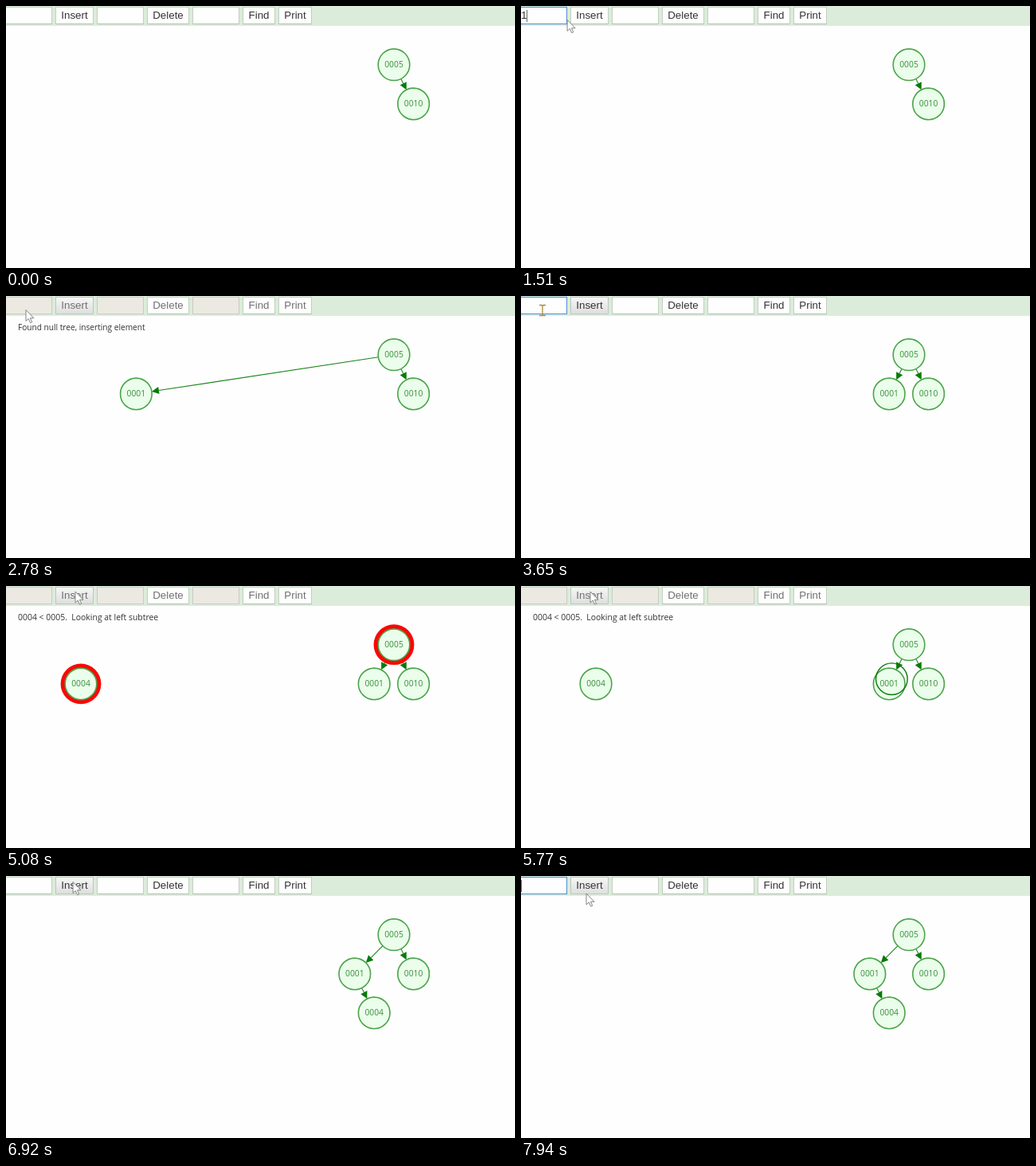
Recreate the animation shown at these times as an HTML page. Size 639x329 px, loop 7.99 s.

```html
<!DOCTYPE html>
<html lang="en">
<head>
<meta charset="utf-8">
<title>Binary search tree insertion</title>
<style>
  html, body { margin: 0; width: 100%; height: 100%; overflow: hidden; background: #fefefe; }
  #bar { position: absolute; left: 0; top: 0; width: 100%; height: 25px; background: #dcecda; }
  .ctl {
    position: absolute; top: 1px; height: 22px; box-sizing: border-box;
    border: 1px solid #c3cfc1; border-bottom-color: #b4beb2; background: #fefefe;
    font: 13.333px/20px Arial, "Liberation Sans", sans-serif; color: #333;
    text-align: center; white-space: pre;
  }
  .field { text-align: left; padding-left: 5px; }
  .off .ctl { color: #707070; }
  .off .field { background: #ece9e3; border-color: #c9cbc0; }
  .ctl.hot { background: linear-gradient(#f6f6f6, #dfdfdf); border-color: #bcc6c2; }
  .ctl.focus { border-color: #4a8fe0; }
  #caret { position: absolute; top: 5px; width: 1px; height: 15px; background: #666; }
  svg { position: absolute; left: 0; top: 0; }
  svg text { font-family: "Open Sans", "Noto Sans", sans-serif; }
</style>
</head>
<body>
<div id="bar"></div>
<svg id="stage" width="639" height="329" viewBox="0 0 639 329"></svg>
<script>
const LOOP = 7990, R = 19.8;
const bar = document.getElementById('bar');
const stage = document.getElementById('stage');

// Moments of the two insertions
const A = { make: 2005, compare: 2375, move: 2747, end: 3090, ready: 3160 };
const B = { make: 4711, compare: 5080, walk: 5449, compare2: 5818, move: 6187, end: 6530, ready: 6590 };

const ROOT = [487, 73.7], RIGHT = [511.6, 122.9], LEFT = [462.2, 122.9];
const LEFT_END = [437.8, 122.9], LEAF = [462.2, 171.9], SPAWN = [94, 122.9];

const MESSAGES = [
  [0, ''],
  [A.make, 'Inserting 0001'],
  [A.compare, '0001 < 0005.\u00a0 Looking at left subtree'],
  [A.move, 'Found null tree, inserting element'],
  [A.end, ''],
  [B.make, 'Inserting 0004'],
  [B.compare, '0004 < 0005.\u00a0 Looking at left subtree'],
  [B.compare2, '0004 >= 0001.\u00a0 Looking at right subtree'],
  [B.move, 'Found null tree, inserting element'],
  [B.end, '']
];

// Pointer path: time, x, y
const PATH = [
  [300, 2, 294], [500, 13, 225], [750, 25, 110], [940, 29, 30], [1030, 29, 12],
  [1100, 29, 12], [1140, 45, 22], [1480, 45, 22], [1510, 58, 17.5],
  [1680, 70, 13], [1850, 82, 10], [2050, 84, 12], [2270, 84, 17],
  [2500, 58, 18], [2720, 25, 17.5], [3100, 25, 17.5], [3200, 27, 18],
  [4080, 27, 18], [4260, 50, 8], [4560, 87, 7], [6900, 87, 7],
  [7080, 62, 11], [7260, 37, 12], [7740, 37, 12], [7940, 82, 22]
];

const within = (t, a, b) => t >= a && t < b;
const part = (t, a, b) => Math.min(1, Math.max(0, (t - a) / (b - a)));
const mix = (p, q, k) => [p[0] + (q[0] - p[0]) * k, p[1] + (q[1] - p[1]) * k];
const twice = k => 1 - (1 - k) * (1 - k);

function set(el, attrs) {
  for (const k in attrs) el.setAttribute(k, attrs[k]);
}
function svg(tag, attrs, parent = stage) {
  const el = document.createElementNS('http://www.w3.org/2000/svg', tag);
  set(el, attrs);
  return parent.appendChild(el);
}
function show(el, on) {
  el.style.display = on ? '' : 'none';
}

function control(x, right, label) {
  const el = document.createElement('div');
  el.className = label ? 'ctl' : 'ctl field';
  el.style.left = x + 'px';
  el.style.width = right - x + 'px';
  el.textContent = label;
  return bar.appendChild(el);
}
const field = control(-6, 58, '');
const insert = control(62, 110, 'Insert');
control(114, 173, '');
control(177, 230, 'Delete');
control(234, 293, '');
control(297, 338, 'Find');
control(342, 384, 'Print');
const caret = document.createElement('div');
caret.id = 'caret';
bar.appendChild(caret);

function makeEdge() {
  const g = svg('g', {});
  return {
    g,
    line: svg('line', { stroke: '#1c861c', 'stroke-width': 1.1 }, g),
    head: svg('path', { fill: '#077a07' }, g)
  };
}
function makeNode(label) {
  const g = svg('g', {});
  const ring = svg('circle', { fill: '#fd0606' }, g);
  svg('circle', { r: R, fill: '#ebfdeb', stroke: '#4aa44a', 'stroke-width': 1.6 }, g);
  svg('text', { y: 3, 'text-anchor': 'middle', 'font-size': 10.3, fill: '#37903a' }, g).textContent = label;
  return { g, ring };
}

const edges = [makeEdge(), makeEdge(), makeEdge()];
const five = makeNode('0005'), ten = makeNode('0010');
const one = makeNode('0001'), four = makeNode('0004');
const walker = svg('circle', { r: R, fill: 'none', stroke: '#077a07', 'stroke-width': 1.4 });
const message = svg('text', { x: 15, y: 42.5, fill: '#333' });
const arrow = svg('path', {
  d: 'M0 0V14L3.2 11L5.6 16.2L7.7 15.3L5.4 10.3H10Z',
  fill: '#fff', stroke: '#777', 'stroke-width': 0.9
});
const beam = svg('path', {
  d: 'M-4 -6.5H-1L0 -5.5L1 -6.5H4M0 -5.5V6M-4 6.5H4',
  fill: 'none', stroke: '#a98a3a', 'stroke-width': 1.3
});

function place(el, p) {
  el.setAttribute('transform', `translate(${p[0]} ${p[1]})`);
}
function drawNode(node, p, visible, lit, size) {
  show(node.g, visible);
  show(node.ring, lit);
  place(node.g, p);
  node.ring.setAttribute('r', size);
}
function drawEdge(edge, p, q, visible) {
  show(edge.g, visible);
  const dx = q[0] - p[0], dy = q[1] - p[1], d = Math.hypot(dx, dy) || 1;
  const ux = dx / d, uy = dy / d;
  const tx = q[0] - ux * R, ty = q[1] - uy * R;
  const bx = tx - ux * 9, by = ty - uy * 9;
  set(edge.line, { x1: p[0] + ux * R, y1: p[1] + uy * R, x2: bx, y2: by });
  edge.head.setAttribute('d',
    `M${tx} ${ty}L${bx - uy * 4.5} ${by + ux * 4.5}L${bx + uy * 4.5} ${by - ux * 4.5}Z`);
}

function pointerAt(t) {
  let i = 0;
  while (i < PATH.length - 2 && t >= PATH[i + 1][0]) i++;
  const a = PATH[i], b = PATH[i + 1];
  return mix(a.slice(1), b.slice(1), part(t, a[0], b[0]));
}

function drawTree(t) {
  const moveB = part(t, B.move, B.end);
  const p1 = t < B.move
    ? mix(SPAWN, LEFT, twice(part(t, A.move, A.end)))
    : mix(LEFT, LEFT_END, moveB);
  const p4 = mix(SPAWN, LEAF, twice(moveB));

  // Highlight ring swells and shrinks as a triangle wave
  const phase = (t - 5374 + 1680 * 4) % 1680;
  const size = R + 3 + Math.abs(phase - 840) / 210;
  const litA = within(t, A.compare, A.move);
  const litB = within(t, B.compare, B.walk);
  const litB2 = within(t, B.compare2, B.move);

  drawEdge(edges[0], ROOT, RIGHT, true);
  drawEdge(edges[1], ROOT, p1, t >= A.move);
  drawEdge(edges[2], p1, p4, t >= B.move);
  drawNode(five, ROOT, true, litA || litB, size);
  drawNode(ten, RIGHT, true, false, size);
  drawNode(one, p1, t >= A.make, litA || litB2, size);
  drawNode(four, p4, t >= B.make, litB || litB2, size);

  show(walker, within(t, B.walk, B.compare2));
  place(walker, mix(ROOT, LEFT, part(t, B.walk, B.compare2)));

  const text = MESSAGES.filter(m => t >= m[0]).pop()[1];
  message.textContent = text;
  message.setAttribute('font-size', text.includes('.') ? 10.45 : 10.15);
}

function drawControls(t) {
  const off = within(t, A.make, A.ready) || within(t, B.make, B.ready);
  const focus = within(t, 1075, A.make) || within(t, 3215, B.make) || t >= 7300;
  const typed = within(t, 1505, A.make) ? '1' : within(t, 4030, B.make) ? '4' : '';
  bar.classList.toggle('off', off);
  field.classList.toggle('focus', focus);
  field.textContent = typed;
  insert.classList.toggle('hot', t >= 1600);
  show(caret, focus && !within(t, 3650, 4030));
  caret.style.left = (typed ? 7 : 0) + 'px';

  const p = pointerAt(t);
  const overField = !off && p[0] < 57 && p[1] < 23;
  show(arrow, t >= 300 && !overField);
  show(beam, t >= 300 && overField);
  place(arrow, p);
  place(beam, p);
}

const start = performance.now();
function tick() {
  const t = Math.max(0, performance.now() - start) % LOOP;
  drawTree(t);
  drawControls(t);
  requestAnimationFrame(tick);
}
tick();
</script>
</body>
</html>
```
